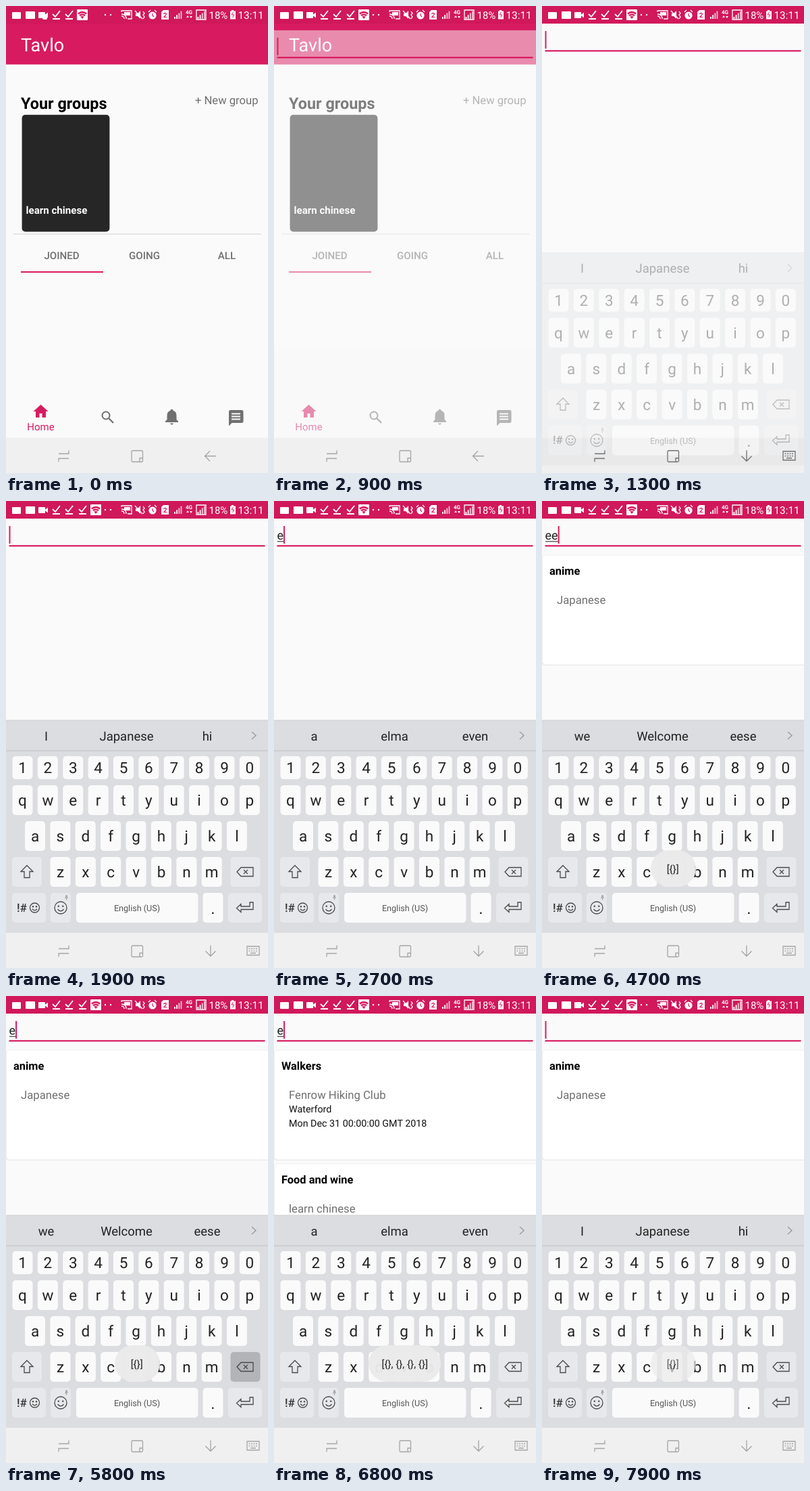
An HTML page that plays this animation: 388 px wide and 690 px high, repeating every 8 s.

```html
<!DOCTYPE html>
<html lang="en">
<head>
<meta charset="utf-8">
<title>Group search</title>
<style>
  html, body { margin: 0; width: 100%; height: 100%; overflow: hidden; background: #fafafa; }
  svg { display: block; width: 100%; height: 100%; font-family: Roboto, sans-serif; text-rendering: geometricPrecision; }
  .mid { text-anchor: middle; }
  .bold { font-weight: 700; }
  .line { fill: none; stroke: currentColor; stroke-width: 1.3; }
</style>
</head>
<body>
<svg id="stage" viewBox="0 0 388 690"></svg>
<script>
const LOOP = 8000, PINK = '#d81b60', GREY = '#707070';
const stage = document.getElementById('stage');

const rect = (x, y, w, h, fill, r = 0, more = '') =>
  `<rect x="${x}" y="${y}" width="${w}" height="${h}" rx="${r}" fill="${fill}" ${more}/>`;
const text = (x, y, size, fill, body, more = '') =>
  `<text x="${x}" y="${y}" font-size="${size}" fill="${fill}" ${more}>${body}</text>`;
const path = (d, more = 'class="line"') => `<path d="${d}" ${more}/>`;
const group = (id, body, more = '') => `<g id="${id}" ${more}>${body}</g>`;
const fill = color => `fill="${color}"`;

// Status bar
const check = x => path(`M${x - 5} 12l4 4 7-9M${x - 5} 19h11`, 'fill="none" stroke="#fff" stroke-width="1.8"');
const wifiBox = x => rect(x - 8, 5, 16, 16, '#fff', 1) +
  path(`M${x - 7} 10.500q7-5.500 14 0l-7 8.500z`, fill(PINK)) +
  path(`M${x - 5.5} 13q5.500-4 11 0M${x - 3.5} 15.500q3.500-2.500 7 0`, 'fill="none" stroke="#fff"');
const camera = (x, busy) => rect(x - 7, 9, 10, 9, '#fff', 1) +
  path(`M${x + 2} 13.5l5-4v8z`, fill('#fff')) + (busy ? rect(x - 1, 14, 7, 6, '#fff', 2) : '');
const bars = (x, y) => [0, 1, 2, 3].map(i =>
  rect(x + i * 3.2, y - 3 - i * 2.8, 1.8, 3 + i * 2.8, '#fff', 0, i > 1 ? 'opacity=".75"' : '')).join('');

function statusBar() {
  const dots = [147, 155].map(x => `<circle cx="${x}" cy="13" r="1.2" fill="#fff"/>`).join('');
  const right =
    path('M171 9V7h15v12h-6M171 12q7 0 7 7M171 15q4 0 4 4') + rect(175, 9, 9, 5, '#fff') +
    path('M192 11h3l4-4v12l-4-4h-3z', fill('#fff')) + path('M191 7l11 12M203 8l2 3-2 2 2 3-2 3') +
    '<circle cx="217" cy="14" r="5.6" fill="#fff"/>' + path('M211 9l3-3M223 9l-3-3') +
    path('M217 11v3l2 2', `fill="none" stroke="${PINK}" stroke-width="1.2"`) +
    path('M230 9l3-3h8v14h-11z', fill('#fff')) + text(235.5, 17, 10, PINK, '2', 'class="mid bold"') +
    bars(249, 19) + text(271, 12, 8, '#fff', '4G', 'class="mid bold"') +
    path('M267 17l2-3 2 3zM272 15l2 3 2-3z', fill('#fff')) +
    path('M282 6h14v14h-14z') + bars(283.5, 19) +
    text(300.5, 18.5, 15, '#fff', '18%') +
    path('M334 6h3v1.500h3v12h-8v-12h2z', fill('#fff')) + path('M336.500 9l-2.500 4h4l-2.500 4', `fill="none" stroke="${PINK}"`) +
    text(343.5, 18.5, 15.3, '#fff', '13:11');
  return group('status', rect(0, 0, 388, 26, '#d0185b') +
    rect(9, 9, 13, 10, '#fff', 1) + rect(29, 8, 14, 11, '#fff', 1) +
    group('iconsA', camera(55, true) + check(74) + check(93) + wifiBox(113)) +
    group('iconsB', camera(55) + check(74) + check(93) + check(113) + wifiBox(133)) +
    dots + right, 'color="#fff"');
}

// Home screen
function homeScreen() {
  const tab = (x, label) => text(x, 374, 15.1, GREY, label, 'class="mid" font-weight="500"');
  return group('home', rect(0, 0, 388, 638, '#fafafa') + rect(0, 26, 388, 60.4, PINK) +
    text(22, 67, 27, '#fff', 'Tavlo') +
    text(22, 152, 23.4, '#000', 'Your groups', 'class="bold"') +
    text(280, 145, 16.6, GREY, '+ New group') +
    rect(23.6, 160.8, 129.8, 172.6, '#262626', 5) +
    text(29.5, 307, 15.1, '#fff', 'learn chinese', 'class="bold"') +
    rect(11, 336.5, 367, 1, '#d2d2d2') +
    tab(82.5, 'JOINED') + tab(205, 'GOING') + tab(327, 'ALL') +
    rect(22, 392, 122, 2, PINK) +
    path('M51.500 589l11 10h-3.500v9h-5.500v-6h-4v6h-5.500v-9h-3.500z', fill(PINK)) +
    text(51.5, 627, 15, PINK, 'Home', 'class="mid"') +
    `<circle cx="148" cy="605" r="5.500" fill="none" stroke="${GREY}" stroke-width="2"/>` +
    path('M152 609l7 7', `stroke="${GREY}" stroke-width="2.300"`) +
    path('M236 615v-1.500l2.500-2.500v-6q0-6 5-7.200v-1q2-2 4 0v1q5 1.200 5 7.200v6l2.500 2.500v1.500zM243 616.500h5q-2.500 4.500-5 0z', fill(GREY)) +
    path('M332 597h17q2.500 0 2.500 2.500v14q0 2.500-2.500 2.500h-14.500l-4.500 4.500v-21q0-2.500 2-2.500z', fill(GREY)) +
    path('M334 602.500h13M334 606.500h13M334 610.500h13', 'stroke="#fafafa" stroke-width="2"'));
}

// Search screen
const card = (y, title, name, extra = '') =>
  rect(0, y + 1, 400, 162, '#e3e3e3', 5) + rect(0.5, y, 400, 162, '#fff', 5, 'stroke="#eee" stroke-width=".8"') +
  text(11, y + 29, 16.4, '#000', title, 'class="bold"') +
  text(22, y + 72, 16.7, GREY, name) + extra;

function searchScreen() {
  const walk = text(22, 172, 14.3, '#111', 'Waterford') +
    text(22, 193, 14.3, '#111', 'Mon Dec 31 00:00:00 GMT 2018');
  return group('search', rect(0, 26, 388, 612, '#fafafa') +
    group('many', card(80, 'Walkers', 'Fenrow Hiking Club', walk) + card(248, 'Food and wine', 'learn chinese')) +
    group('one', card(80, 'anime', 'Japanese')) +
    rect(4.5, 65.2, 379, 2.2, PINK) +
    text(4.5, 57, 18, '#222', '', 'id="typed"') + rect(5, 59.3, 0, 1, '#222', 0, 'id="under"') +
    rect(0, 37, 2, 26, PINK, 0, 'id="caret"'));
}

// Keyboard
const DARK = '#222', SPECIAL = '#e7e8eb';
function keyRow(letters, first, y, h) {
  return [...letters].map((ch, i) => {
    const x = first + i * 37.37;
    return rect(x - 15, y, 30, h, '#fafafa', 5, `id="key-${ch}"`) +
      text(x, y + h / 2 + 7.8, 22.5, DARK, ch, 'class="mid"');
  }).join('');
}
const smiley = (x, y, r) => `<circle cx="${x}" cy="${y}" r="${r}" class="line"/>` +
  [-1, 1].map(s => `<circle cx="${x + s * r * .36}" cy="${y - r * .25}" r="1.200" fill="currentColor"/>`).join('') +
  path(`M${x - r * .5} ${y + r * .25}q${r * .5} ${r * .6} ${r} 0`);

function keyboard() {
  const words = [59.5, 178.5, 298].map((x, i) => text(x, 353.5, 18.5, DARK, '', `class="mid" id="word${i}"`)).join('');
  return group('keyboard', rect(0, 324, 388, 314, '#dcdde1') +
    rect(0, 323.5, 388, 1, '#cfd0d3') + rect(0, 368.5, 388, 1, '#bfc0c3') + words +
    path('M364 341l6 5.500-6 5.500', 'class="line" style="color:#999"') +
    keyRow('1234567890', 24.5, 377, 34) + keyRow('qwertyuiop', 24.5, 420, 44) +
    keyRow('asdfghjkl', 43, 473, 44) + keyRow('zxcvbnm', 80.5, 526, 44) +
    rect(9, 526, 44, 44, SPECIAL, 5) + path('M31 538.500l9 9h-5v9h-8v-9h-5z') +
    rect(332.5, 526, 44, 44, SPECIAL, 5, 'id="erase"') +
    path('M342 548l6-6.500h18v13h-18zM352 545l6 6M358 545l-6 6') +
    rect(9, 579, 50, 44, SPECIAL, 5) + text(16, 606.5, 17, '#333', '!#', 'font-weight="500"') + smiley(42.5, 601, 7) +
    rect(66, 579, 30, 44, SPECIAL, 5) + smiley(81, 601, 9) +
    rect(88, 582, 3, 5, '#aaa', 1.5) + path('M87 586q2.500 3 5 0M89.500 588v2', 'fill="none" stroke="#aaa"') +
    rect(104, 579, 180.5, 44, '#fafafa', 5) + text(194, 606, 12.6, '#555', 'English (US)', 'class="mid"') +
    rect(291.5, 579, 30, 44, '#fafafa', 5) + text(306.5, 610, 24, DARK, '.', 'class="mid"') +
    rect(329, 579, 50, 44, SPECIAL, 5) +
    path('M348 595.500l-6.500 6 6.500 6v-4h18v-10.500h-5v6h-13z'), 'color="#4a4a4a"');
}

function navIcons() {
  return group('nav',
    path('M78 661.500h15v-5M93 668.500h-15v5') +
    path('M202.500 668v-9.500q0-1.500-1.500-1.500h-13.500q-1.500 0-1.500 1.500v13.500q0 1.500 1.500 1.500h10.500v-5.500h4.500v4q0 1.500-1.500 1.500h-3') +
    group('back', path('M311 665h-16M302 657.500l-7.500 7.500 7.500 7.500')) +
    group('down', path('M303 656.500v16M295.500 665l7.500 7.500 7.500-7.500') +
      path('M357 658h18v13h-18zM362 668h8') +
      path('M359.500 661.500h13M359.500 664.800h13', 'class="line" stroke-dasharray="2 1.500"')));
}

const toast = (id, x, w, body) => group(id, rect(x, 516, w, 54, '#ebebeb', 27, 'opacity=".96"') +
  text(193.7, 549, 15, '#222', body, 'class="mid"'));

stage.innerHTML = homeScreen() + searchScreen() + rect(0, 638, 388, 52, '#f0f0f0') +
  keyboard() + navIcons() + toast('toastMany', 140, 107, '[{}, {}, {}, {}]') + toast('toastOne', 161, 67, '[{}]') + statusBar();

const el = {};
stage.querySelectorAll('[id]').forEach(node => el[node.id] = node);

// Timeline helpers
const ramp = (t, from, to) => Math.min(1, Math.max(0, (t - from) / (to - from)));
const within = (t, ...spans) => spans.some(([from, to]) => t >= from && t < to);
const latest = (t, steps) => steps.filter(([start]) => t >= start).pop()[1];
const show = (node, on) => node.setAttribute('opacity', +on);

const WORDS = [[0, 'I Japanese hi'], [2600, 'a elma even'], [4000, 'we Welcome eese'],
  [6100, 'a elma even'], [7550, 'I Japanese hi']];
const TYPED = [[0, ''], [2500, 'e'], [3850, 'ee'], [5700, 'e'], [7200, '']];
const LIST = [[0, ''], [2900, 'many'], [4200, 'one'], [6100, 'many'], [7600, 'one']];

function draw(t) {
  const open = ramp(t, 750, 1050), rise = ramp(t, 1200, 1495), list = latest(t, LIST);
  show(el.iconsA, t < 300);
  show(el.iconsB, t >= 300);
  show(el.home, open < 1);
  show(el.search, open);
  el.search.setAttribute('transform', `translate(0 ${40 * (1 - open) ** 2})`);
  show(el.many, list === 'many');
  show(el.one, list === 'one');

  show(el.keyboard, rise);
  el.keyboard.setAttribute('transform', `translate(0 ${62 * (1 - rise)})`);
  show(el.back, t < 1200);
  show(el.down, t >= 1200);
  const shade = t < 1200 ? 165 : 112 + 53 * ramp(t, 1500, 1800);
  el.nav.setAttribute('color', `rgb(${shade},${shade},${shade})`);

  const typed = latest(t, TYPED);
  el.typed.textContent = typed;
  el.under.setAttribute('width', typed.length * 9.6);
  el.caret.setAttribute('x', 4.5 + typed.length * 9.6);
  show(el.caret, !within(t, [1500, 1700], [2200, 2450], [3000, 3350], [4300, 4600], [5200, 5600], [6200, 6700]));
  latest(t, WORDS).split(' ').forEach((word, i) => el['word' + i].textContent = word);

  el['key-e'].setAttribute('fill', within(t, [2400, 2500], [3750, 3850]) ? '#c4c5c9' : '#fafafa');
  el.erase.setAttribute('fill', within(t, [5650, 6000], [7150, 7500]) ? '#b3b4b8' : SPECIAL);

  show(el.toastMany, ramp(t, 2900, 3200) * (1 - ramp(t, 3400, 3760)) + ramp(t, 6200, 6400) * (1 - ramp(t, 7500, 7650)));
  show(el.toastOne, ramp(t, 4200, 4600) * (1 - ramp(t, 6000, 6200)) + ramp(t, 7600, 8020));
}

function tick() {
  draw(performance.now() % LOOP);
  requestAnimationFrame(tick);
}
tick();
</script>
</body>
</html>
```
